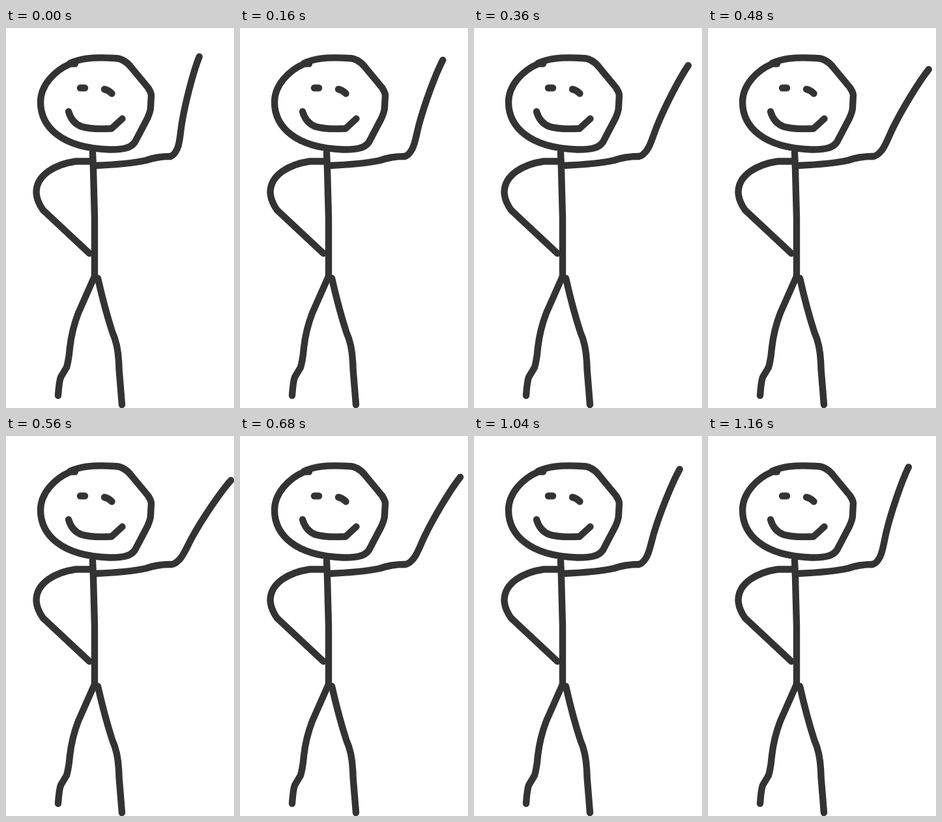
Write an HTML page that moves like this. It is 350 px wide and 580 px high and loops after 1200 ms.

```html
<!DOCTYPE html>
<html lang="en">
<head>
<meta charset="utf-8">
<title>Waving stick figure</title>
<style>
  html, body { margin: 0; width: 100%; height: 100%; overflow: hidden; background: #fff; }
  svg { display: block; width: 100vw; height: 100vh; }
  path { fill: none; stroke: #333; stroke-width: 10.4; stroke-linecap: round; stroke-linejoin: round; }
</style>
</head>
<body>
<svg viewBox="0 0 350 580">
  <!-- head and face -->
  <path d="M106 54.5H99C74 65 53 88 53 113C53 150 84 183 158 185.5C180 186 192 183 198 174L217 138Q222 127 222 121L223 102Q222 97 218 91L193 61Q182 46 166 46C130 44 113 47 98 54"/>
  <path d="M114 91.5H121"/>
  <path d="M151 93.5Q157 94.5 162.5 100"/>
  <path d="M96 127.5Q101 145 116 150.5Q130 155 162 153.5L178.5 138.5"/>
  <!-- body and resting arm -->
  <path d="M133 190L134 215L136 290V379"/>
  <path d="M133 203.5H107C76 208 46.5 224 46.5 251Q47 264 57 278L128 344"/>
  <!-- legs -->
  <path d="M135.5 380L111 435Q101 461 98 488Q96.5 506 93 518L84 533Q81.5 540 80 561"/>
  <path d="M141 382Q152 430 163.5 465Q173 485 173.5 520L178 575"/>
  <!-- waving arm -->
  <path d="M137 210Q187 208 215 202Q232 196 252 196"/>
  <path id="forearm" d="M296.7 43.8C287 68 275 115 270 145C267 164 267 175 263 184Q258 195 252 196"/>
</svg>
<script>
  const LOOP = 1200, STEP = 40, TURN = 560;
  const PEAK = 19.6, FALL = 0.0256;
  const forearm = document.getElementById('forearm');

  // Swings out steadily, returns more slowly, then snaps back at the loop.
  function swing(t) {
    return t <= TURN ? PEAK * t / TURN : PEAK - FALL * (t - TURN);
  }

  function draw(now) {
    const t = Math.floor((now % LOOP) / STEP) * STEP;
    forearm.setAttribute('transform', `rotate(${swing(t)} 252 196)`);
  }

  const start = performance.now();
  function tick() {
    draw(performance.now() - start);
    requestAnimationFrame(tick);
  }
  tick();
</script>
</body>
</html>
```
